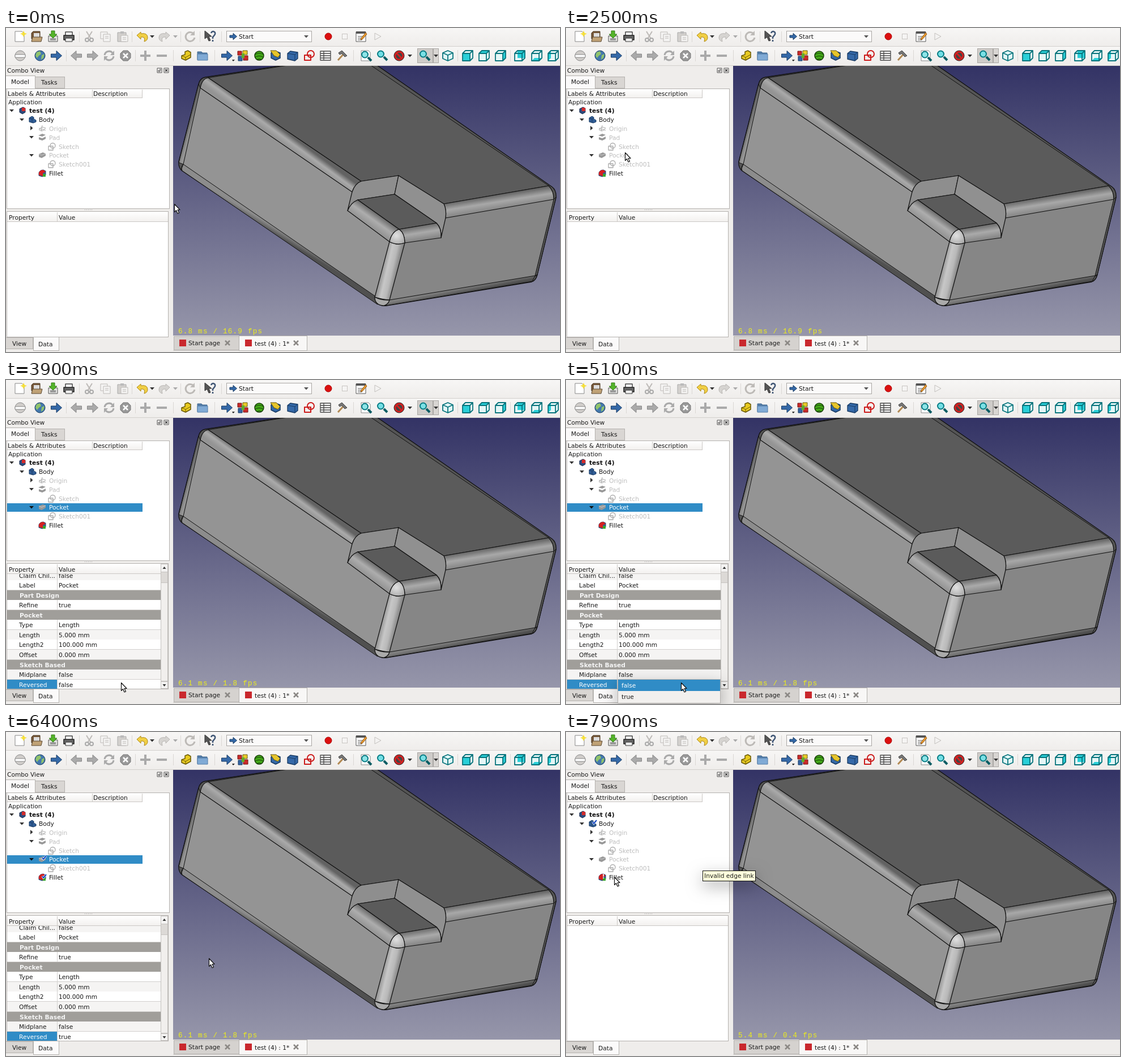
Write an HTML page with a canvas that moves like this. It is 978x573 px and loops after 8000 ms.

```html
<!DOCTYPE html>
<html lang="en">
<head>
<meta charset="utf-8">
<title>Editing a pocket</title>
<style>
html, body { margin: 0; height: 100%; overflow: hidden; background: #efedeb }
canvas { display: block }
</style>
</head>
<body>
<canvas id="stage" width="978" height="573"></canvas>
<script>
const W = 978, H = 573, LOOP = 8000, BLUE = '#308cc6', PANEL = '#efedeb', EDGE = '#b4b1ae';
const stage = document.getElementById('stage').getContext('2d');
const backdrop = document.createElement('canvas');
backdrop.width = W;
backdrop.height = H;
let c = backdrop.getContext('2d');

function rect(x, y, w, h, fill, stroke) {
  if (fill) { c.fillStyle = fill; c.fillRect(x, y, w, h); }
  if (stroke) { c.strokeStyle = stroke; c.lineWidth = 1; c.strokeRect(x + .5, y + .5, w - 1, h - 1); }
}
function path(d, fill, stroke, width = 1) {
  const p = new Path2D(d);
  if (fill) { c.fillStyle = fill; c.fill(p); }
  if (stroke) { c.strokeStyle = stroke; c.lineWidth = width; c.stroke(p); }
}
// Each part is [path, fill, stroke, line width], drawn around (x, y).
function icon(x, y, ...parts) {
  c.save();
  c.translate(x, y);
  c.lineJoin = 'round';
  parts.forEach(part => path(...part));
  c.restore();
}
function text(s, x, y, color = '#1a1a1a', bold = '') {
  c.font = `${bold} 10.67px "DejaVu Sans", sans-serif`;
  c.fillStyle = color;
  c.fillText(s, x, y);
}
function gradient(x1, y1, x2, y2, ...colors) {
  const g = c.createLinearGradient(x1, y1, x2, y2);
  colors.forEach((color, i) => g.addColorStop(i / (colors.length - 1), color));
  return g;
}
const circle = r => `M${-r} 0a${r} ${r} 0 1 0 ${2 * r} 0a${r} ${r} 0 1 0 ${-2 * r} 0Z`;
const DOWN = 'M-4 -2H4L0 2.5Z', RIGHT = 'M-2 -4V4L2.5 0Z';
const ARROW = 'M-9.5 -3H0V-8.5L9.5 0L0 8.5V3H-9.5Z', BACK = 'M9.5 -3H0V-8.5L-9.5 0L0 8.5V3H9.5Z';

function solid() {
  const ink = '#111';
  c.save();
  c.beginPath();
  c.rect(295, 67, 683, 477);
  c.clip();
  c.lineJoin = 'round';
  rect(295, 67, 683, 477, gradient(0, 67, 0, 544, '#333365', '#9696aa'));
  path('M340 99Q343 88 352 87L490 66H655L964 281Q972 287 971 300L938 436Q936 446 928 449L672 491Q660 493 652 484L310 252Q304 246 305 236Z', '#555', ink, 1.3);
  path('M357 88L497 66H644L958 279L773 311L693 261L627 271Z', '#5b5b5b', ink);
  path('M343 106L611 290L603 323L677 378L651 476L313 241Z', '#949494');
  path('M704 380L768 371L776 336L967 303L934 438L677 481Z', '#868686');
  path('M343 106L313 241L305 238L340 99Z', gradient(320, 165, 330, 168, '#505050', '#949494'), ink);
  path('M343 106Q346 90 357 88L627 271Q616 275 611 290Z', gradient(487, 179, 476, 194, '#626262', '#aaa', '#949494'), ink, 1.2);
  path('M773 311L958 279Q967 288 967 303L776 336Q778 322 773 311Z', gradient(866, 295, 870, 320, '#626262', '#a8a8a8', '#868686'), ink, 1.2);
  path('M313 241L660 480L656 489L309 251Z', gradient(486, 359, 480, 369, '#8c8c8c', '#505050'), ink);
  path('M677 481L934 438L929 448L670 491Z', gradient(800, 460, 802, 470, '#808080', '#4c4c4c'), ink);
  path('M967 303L934 438L938 436L971 299Z', '#555', ink);
  path('M627 271L693 261L686 294L621 304Q609 309 603 323L611 290Q616 275 627 271Z', '#8e8e8e', ink, 1.2);
  path('M693 261L773 311Q778 322 776 336L768 371Q769 354 760 345L686 294Z', '#909090', ink, 1.2);
  path('M621 304L686 294L760 345L694 356Z', '#5b5b5b', ink, 1.2);
  path('M621 304L694 356Q681 360 677 378L603 323Q609 309 621 304Z', gradient(658, 330, 643, 351, '#686868', '#adadad', '#949494'), ink, 1.2);
  path('M694 356L760 345Q769 354 768 371L704 380Q704 363 694 356Z', gradient(727, 350, 731, 375, '#686868', '#aaa', '#868686'), ink, 1.2);
  path('M677 378Q690 385 704 380L677 481Q665 480 651 476Z', gradient(664, 425, 690, 431, '#949494', '#c7c7c7', '#b9b9b9', '#868686'), ink, 1.2);
  const shine = c.createRadialGradient(689, 367, 1, 689, 367, 20);
  shine.addColorStop(0, '#dedede');
  shine.addColorStop(1, '#a2a2a2');
  path('M694 356Q681 360 677 378Q690 385 704 380Q704 363 694 356Z', shine, ink, 1.2);
  path('M651 476Q651 490 667 491Q675 489 677 481Q663 482 651 476Z', '#aaa', ink, 1.2);
  path('M313 241Q308 246 311 252M934 438Q938 440 938 436', null, ink);
  c.restore();
}

function topToolbar() {
  const faded = '#bdbab7', dark = '#444';
  const sheet = 'M-8 -9H4L8 -5V9H-8Z';
  icon(24, 15, [sheet, '#fff', '#888'], ['M7 -10L9 -6L13 -5L9 -3L7 1L5 -3L1 -5L5 -6Z', '#f5df38']);
  icon(54, 15, ['M-9 -6L-6 -9H6V4H-9Z', '#765839', '#4c3822'], ['M-5 -6H5V2H-5Z', '#ddd'], ['M-9 9L-7 1H10L8 9Z', '#c0a276', '#5b4831']);
  icon(83, 15, ['M-8 -1H8V9H-8Z', '#e4e4e2', '#555'], ['M-5 3H5V7H-5Z', '#999'], ['M-3 -10H3V-4H7L0 3L-7 -4H-3Z', '#55b52a', '#317b17']);
  icon(111, 15, ['M-6 -8H6V0H-6Z', '#fff', dark, 1.5], ['M-9 -2H9V6H-9Z', '#666', '#222', 1.5], ['M-6 3H6V9H-6Z', '#eee', '#333']);
  icon(147, 15, ['M-5 -9L3 4M5 -9L-3 4', null, faded, 2], ['M-7 6a3 3 0 1 0 6 0a3 3 0 1 0 -6 0M1 6a3 3 0 1 0 6 0a3 3 0 1 0 -6 0', null, '#aaa', 2]);
  icon(176, 15, ['M-9 -8H3V4H-9Z', '#f4f3f2', faded], ['M-4 -4H8V9H-4ZM-1 0H5M-1 3H5', '#f4f3f2', faded]);
  icon(206, 15, ['M-9 -7H6V9H-9Z', '#d3d0cd', '#aaa'], ['M-4 -9H2V-5H-4Z', '#bbb'], ['M-3 -2H9V9H-3ZM0 2H6M0 5H6', '#f4f3f2', faded]);
  const undo = 'M-10 -2L-3 -8V-5Q9 -7 9 2Q9 7 3 9Q6 0 -3 1V5Z';
  icon(241, 15, [undo, '#f1cf45', '#ae8a14']);
  icon(258, 15, [DOWN, '#333']);
  c.save();
  c.translate(279, 15);
  c.scale(-1, 1);
  path(undo, '#d6d4d1', '#b9b6b3');
  c.restore();
  icon(299, 15, [DOWN, '#aaa']);
  icon(325, 15, ['M6 -5A8 8 0 1 0 8 2', null, faded, 3], ['M8 -10V-2H0Z', faded]);
  icon(360, 15, ['M-9 -10V4L-5 1L-2 8L1 7L-2 0H3Z', '#555', '#333'], ['M2 -6Q3 -9 6 -9Q10 -8 9 -4Q8 -2 5 1V4M5 6V9', null, '#405675', 2.5]);
  rect(389, 5, 151, 20, '#fbfafa', '#aaa7a4');
  icon(401, 15, ['M-6 -2H0V-5.5L6.5 0L0 5.5V2H-6Z', '#3569a8', '#173a63']);
  text('Start', 411, 19);
  icon(530, 15, [DOWN, '#555']);
  icon(569, 15, [circle(6), '#dc1010', '#a00']);
  rect(593, 10, 10, 10, '#f5f4f3', '#c8c5c2');
  icon(627, 15, ['M-9 -8H8V9H-9ZM-6 0H4M-6 3H4M-6 6H2', '#fff', '#555'], ['M-9 -9H8V-5H-9Z', '#555'], ['M8 -7L10 -4L2 5L-1 6L0 3Z', '#e99b2e', '#8f571b']);
  icon(656, 15, ['M-5 -6L6 0L-5 6Z', '#f3f2f1', '#c3c0bd']);
}

function viewCube(x, face) {
  icon(x, 49, ['M-9 -4L-4 -9H9V4L4 9H-9Z', '#e5f6f6'], [face, '#29cfd8'],
    ['M-9 -4L-4 -9H9V4L4 9H-9ZM-9 -4H4V9M4 -4L9 -9', null, '#08747c', 1.8]);
}
function magnifier(x, y, lens) {
  icon(x, y, ['M2 2L8 8', null, '#075c63', 4], ['M-9 -3a5.5 5.5 0 1 0 11 0a5.5 5.5 0 1 0 -11 0Z', lens, '#087b83', 2]);
}
function lowerToolbar() {
  const faded = '#aaa', rim = '#888', blue = '#3569a8', navy = '#173a63';
  icon(25, 49, [circle(9), '#d0cdca', rim], ['M-9 -2H9V3H-9Z', '#fff', rim]);
  icon(60, 49, [circle(9), '#4479ad', '#173a63'], ['M-6 -6L0 -8L2 -3L-2 0L-5 4L-8 0ZM3 -1L8 -3L6 4L2 7Z', '#91c46b']);
  icon(89, 49, [ARROW, blue, navy]);
  icon(124, 49, [BACK, faded, rim]);
  icon(153, 49, [ARROW, faded, rim]);
  icon(182, 49, ['M-8 -1A8 8 0 0 1 6 -5M8 1A8 8 0 0 1 -6 5', null, faded, 3], ['M9 -9V-1H2ZM-9 9V1H-2Z', faded]);
  icon(211, 49, ['M-4 -9H4L9 -4V4L4 9H-4L-9 4V-4Z', '#999', '#777'], ['M-4 -4L4 4M4 -4L-4 4', null, '#fff', 2.5]);
  icon(246, 49, ['M-9 0H9M0 -9V9', null, faded, 4]);
  icon(275, 49, ['M-9 0H9', null, faded, 4]);
  icon(318, 49, ['M-8 0L-2 -2V-7L3 -9L8 -6V3L-1 8L-8 5Z', '#e8ca20', '#6c5b05', 1.5], ['M-8 0L-1 3L8 -2M-1 3V8', null, '#6c5b05']);
  icon(347, 49, ['M-9 -7H-2L0 -5H8V7H-9Z', '#527ca7', '#456a91'], ['M-9 -3H9V8H-9Z', '#80aad5', '#527ca7']);
  icon(390, 49, [ARROW, blue, navy]);
  icon(401, 57, ['M-2 -1H3L0 2Z', '#222']);
  icon(418, 49, ['M-9 -8H-2V-1H-9Z', '#cc2929', '#701616'], ['M0 -9H8V-2H0Z', '#e9cb27', '#685c14'], ['M-8 1H-1V9H-8Z', '#3464a4', navy], ['M1 0H9V8H1Z', '#cc2929', '#701616'], ['M-2 -4H3V4H-2Z', '#62ad27']);
  icon(447, 49, [circle(8), '#43a818', '#173f08', 1.5], ['M-8 -2Q0 -7 8 -2M-8 3Q0 -2 8 3M-4 7Q0 4 4 7', null, '#173f08']);
  icon(476, 49, ['M-8 -5L0 -8L8 -5V4L0 8L-8 4Z', blue, navy, 1.5], ['M-9 -9H1L8 -2L4 3L-3 0Z', '#e6c52c', '#665406']);
  icon(506, 49, ['M-9 -4L-4 -8L9 -6V5L4 9L-9 6Z', blue, navy, 1.3], ['M-9 -4L4 -2L9 -6M4 -2V9', null, navy]);
  icon(535, 49, ['M-8 -1H3V8H-8Z', null, '#cc1b1b', 2], ['M-3 -3a6 6 0 1 0 12 0a6 6 0 1 0 -12 0', null, '#cc1b1b', 2]);
  icon(564, 49, ['M-9 -8H9V8H-9ZM-9 -4H9M-9 0H9M-9 4H9M-3 -8V8', '#fff', '#444', 1.3]);
  icon(593, 49, ['M-7 8L2 -2', null, '#b38a53', 3], ['M-6 -5L0 -9L9 0L5 2L0 -4L-4 -2Z', '#777', '#444']);
  icon(635, 49, ['M-8 -9H5L8 -6V9H-8Z', '#fff', '#888']);
  magnifier(637, 50, '#8ee4e7');
  magnifier(665, 49, '#73dfe5');
  icon(694, 49, [circle(9), '#444', '#222'], [circle(7), null, '#d32020', 3], ['M-5 -5L5 5', null, '#d32020', 3]);
  icon(713, 49, [DOWN, '#333']);
  rect(726, 36, 28, 26, '#cfccc9', '#aaa7a4');
  rect(754, 36, 10, 26, '#d9d6d3', '#aaa7a4');
  magnifier(740, 49, '#7be0e5');
  icon(759, 49, [DOWN, '#333']);
  icon(780, 49, ['M0 -9L9 -5V5L0 9L-9 5V-5Z', '#e1f7f7', '#08747c', 1.8], ['M-9 -5L0 -1L9 -5M0 -1V9', null, '#08747c', 1.8]);
  viewCube(815, 'M-9 -4H4V9H-9Z');
  viewCube(844, 'M-9 -4L-4 -9H9L4 -4Z');
  viewCube(873, 'M4 -4L9 -9V4L4 9Z');
  viewCube(907, 'M-4 -9H9V4H-4Z');
  viewCube(937, 'M-9 9L-4 4H9L4 9Z');
  viewCube(966, 'M-9 -4L-4 -9V4L-9 9Z');
}

function sketchIcon(x, y) {
  icon(x, y, ['M-6 -1H2V6H-6Z', null, '#aaa', 1.3], ['M-3 -2a4.5 4.5 0 1 0 9 0a4.5 4.5 0 1 0 -9 0', null, '#aaa', 1.3]);
}
function pocketIcon(x, y) {
  icon(x, y, ['M-6 -2L1 -5L6 -3V1L-1 5L-6 3Z', '#999'], ['M-6 -2L-1 0L6 -3', null, '#ccc']);
}
function header(x, y, w, h) {
  rect(x, y, w, h, gradient(0, y, 0, y + h, '#fff', '#f2f0ee'));
}
function tree() {
  const faded = '#bdbdbd';
  rect(1, 107, 288, 213, '#fff', EDGE);
  header(2, 108, 239, 16);
  path('M2 123.5H241M152.5 109V123M240.5 109V123', null, '#cbc8c5');
  text('Labels & Attributes', 3, 120);
  text('Description', 154, 120);
  text('Application', 4, 135);
  text('test (4)', 41, 150, '#111', 'bold');
  text('Body', 58, 166);
  text('Origin', 76, 182, faded);
  text('Pad', 76, 198, faded);
  text('Sketch', 93, 213.5, faded);
  text('Sketch001', 93, 245, faded);
  text('Fillet', 76, 261);
  [[10, 146], [28, 162], [45, 193]].forEach(([x, y]) => icon(x, y, [DOWN, '#333']));
  icon(45, 177, [RIGHT, '#333']);
  icon(29, 146, ['M-5 -3L1 -6L5 -4V3L0 6L-5 3Z', '#2a4b7e', '#15294b'], ['M-1 -5H5V1H-1Z', '#d42b2b']);
  icon(47, 162, ['M-6 -3L-1 -6L2 -4V-1L6 1V4L1 6L-6 4Z', '#315d96', '#173a63'], ['M-6 -3L-1 -1L2 -3M-1 -1V5', null, '#173a63']);
  icon(64, 178, ['M-6 2L-1 -3L6 -1L1 4ZM-2 5L0 -6M-6 -1L6 3', null, '#aaa']);
  icon(64, 193, ['M-7 -3L0 -6L6 -4L0 -1ZM-6 0L0 2L6 -1V3L0 6L-6 4Z', '#999']);
  sketchIcon(81, 210);
  sketchIcon(81, 241);
  icon(64, 257, ['M-6 4V-1Q-4 -6 2 -6L6 -4V3L0 6Z', '#335c94', '#26446e'], ['M-6 3V-1Q-4 -6 2 -6L6 -3L1 0V5Z', '#d62020'], ['M1 1H6V6H1Z', '#38a82d']);
}

function closeMark(x) {
  icon(x, 557, ['M-4 -4L4 4M4 -4L-4 4', null, '#8b8885', 2.5]);
}
function paintBackdrop() {
  rect(0, 0, W, H, PANEL);
  rect(0, 0, W, 32, gradient(0, 0, 0, 32, '#f7f6f5', PANEL));
  rect(0, 33, W, 33, gradient(0, 33, 0, 66, '#f7f6f5', PANEL));
  path('M0 32.5H978M0 66.5H978', null, '#d3d0cd');
  path('M129.5 6V25M222.5 6V25M308.5 6V25M342.5 6V25M380.5 6V25M106.5 39V59M228.5 39V59M295.5 39V59M368.5 39V59M613.5 39V59M797.5 39V59M890.5 39V59', null, '#dad7d4');
  topToolbar();
  lowerToolbar();
  text('Combo View', 2, 79);
  [271, 283].forEach(x => icon(x, 75, ['M-4 -4H4V4H-4Z', null, '#555']));
  icon(271, 75, ['M-2 0H1V2H-2ZM0 -2H2V0', null, '#555']);
  icon(283, 75, ['M-2 -2L2 2M2 -2L-2 2', null, '#333', 1.3]);
  rect(51, 86, 53, 21, '#d9d6d3', EDGE);
  rect(-1, 84, 53, 24, '#fbfafa', EDGE);
  text('Model', 9, 99);
  text('Tasks', 62, 100);
  tree();
  for (let x = 139; x < 154; x += 3) rect(x, 321, 1, 1, '#999');
  rect(-1, 547, 49, 21, '#d9d6d3', EDGE);
  rect(48, 546, 46, 25, '#fbfafa', EDGE);
  text('View', 11, 562);
  text('Data', 57, 563);
  solid();
  rect(295, 544, 683, 29, PANEL);
  path('M295 570.5H978', null, '#d3d0cd');
  rect(296, 545, 116, 25, '#d5d2cf', EDGE);
  rect(411, 544, 121, 27, '#f8f7f6', EDGE);
  rect(306, 551, 12, 12, '#c9282d');
  rect(422, 551, 12, 12, '#c9282d');
  text('Start page', 322, 561);
  text('test (4) : 1*', 439, 562);
  closeMark(391);
  closeMark(512);
}

const PROPERTIES = [['Base'], ['Claim Chil...', 'false'], ['Label', 'Pocket'], ['Part Design'], ['Refine', 'true'],
  ['Pocket'], ['Type', 'Length'], ['Length', '5.000 mm'], ['Length2', '100.000 mm'], ['Offset', '0.000 mm'],
  ['Sketch Based'], ['Midplane', 'false'], ['Reversed', 'false']];

function propertyRows(t, shift) {
  c.save();
  c.beginPath();
  c.rect(2, 343, 271, 203);
  c.clip();
  PROPERTIES.forEach(([name, value], i) => {
    const y = Math.round(319 + i * 17.55 + shift), base = y + 13;
    if (!value) {
      rect(2, y, 271, 17, '#a09e9a');
      text(name, 24, base, '#f5f5f5', 'bold');
      return;
    }
    const active = name === 'Reversed' && t >= 3900;
    rect(2, y, 271, 18, i % 2 ? '#f5f4f3' : '#fff');
    if (active) rect(2, y, 88, 17, BLUE);
    path(`M2 ${y + 17.5}H273M90.5 ${y}V${y + 18}`, null, '#d2d0ce');
    text(name, 23, base, active ? '#fff' : undefined);
    text(active && t >= 5900 ? 'true' : value, 93, base);
  });
  c.restore();
}
function scrollBar(handleTop) {
  const border = '#c6c3c0';
  rect(273, 325, 13, 221, '#dcd9d6', border);
  rect(273, 325, 13, 15, '#f4f3f2', border);
  rect(273, handleTop, 13, 175, '#f1efed', border);
  rect(273, 533, 13, 13, '#f4f3f2', border);
  icon(279.5, 332, ['M-3 2H3L0 -2Z', '#333']);
  icon(279.5, 540, ['M-3 -2H3L0 2Z', '#333']);
}
function properties(t, selected) {
  rect(1, 324, 286, 223, '#fff', EDGE);
  if (selected) {
    const scrolled = t >= 3700;
    propertyRows(t, scrolled ? 0 : 24);
    scrollBar(scrolled ? 358 : 340);
  }
  const width = selected ? 271 : 284;
  header(2, 325, width, 18);
  path(`M2 342.5H${width + 2}M90.5 326V342`, null, '#cbc8c5');
  text('Property', 5, 338.5);
  text('Value', 93, 338.5);
}

function floating(x, y, w, h, fill, border) {
  c.save();
  c.shadowColor = 'rgba(0,0,0,.3)';
  c.shadowBlur = 28;
  c.shadowOffsetY = 9;
  rect(x, y, w, h, fill);
  c.restore();
  rect(x, y, w, h, null, border);
}
function valueEditor(t) {
  if (t < 5100) {
    rect(91, 529, 182, 17, '#f8f7f6', '#aaa7a4');
    text('false', 98, 542);
    icon(263, 538, [DOWN, '#555']);
    return;
  }
  floating(91, 529, 182, 43, '#f2f0ee', EDGE);
  const hoverTrue = t >= 5500;
  rect(92, hoverTrue ? 550 : 530, 180, 20, BLUE);
  text('false', 98, 544, hoverTrue ? undefined : '#fff');
  text('true', 98, 564, hoverTrue ? '#fff' : undefined);
}

function checkMark(x, y) {
  icon(x, y, ['M-3 -1L-1 2L4 -4', null, '#fff', 3.5], ['M-3 -1L-1 2L4 -4', null, '#1749c5', 2]);
}

// time, x, y of the pointer's tip
const POINTER = [[0, 297, 311], [700, 297, 311], [900, 286, 308], [1100, 286, 308], [1300, 274, 306], [1500, 274, 306],
  [2400, 102, 229], [2500, 104, 220], [3200, 104, 220], [3900, 203, 535], [5300, 203, 535], [5600, 194, 555],
  [5900, 194, 555], [6400, 358, 400], [6700, 536, 399], [7100, 156, 270], [7600, 84, 261], [7900, 85, 256]];

function pointer(t) {
  const i = Math.max(1, POINTER.findIndex(k => k[0] >= t));
  const [t0, x0, y0] = POINTER[i - 1], [t1, x1, y1] = POINTER[i];
  const u = (t - t0) / (t1 - t0), e = u * u * (3 - 2 * u);
  icon(Math.round(x0 + (x1 - x0) * e), Math.round(y0 + (y1 - y0) * e),
    ['M.5 .5V14.5L3.5 11.5L6 17L8.5 16L6 10.5H10Z', '#fff', '#111', 1.2]);
}

function draw(t) {
  const selected = t >= 3200 && t < 6700, recomputed = t >= 6700;
  c.drawImage(backdrop, 0, 0);
  if (selected) rect(2, 218, 239, 15, BLUE);
  icon(45, 225, [DOWN, selected ? '#111' : '#333']);
  pocketIcon(64, 225);
  text('Pocket', 76, 229, selected ? '#fff' : '#bdbdbd');
  if (selected && t >= 6000) { checkMark(67, 223); checkMark(67, 256); }
  if (recomputed) {
    checkMark(50, 160);
    icon(66, 255, ['M0 -4V1M0 2V4', null, '#fff', 1.6]);
  }
  properties(t, selected);
  c.font = '12.5px "Liberation Mono", monospace';
  c.letterSpacing = '1.28px';
  c.fillStyle = '#eeee18';
  c.fillText(recomputed ? '5.4 ms / 0.4 fps' : selected ? '6.1 ms / 1.8 fps' : '6.8 ms / 16.9 fps', 304, 540);
  c.letterSpacing = '0px';
  if (t >= 4400 && t < 5900) valueEditor(t);
  if (t >= 7600) {
    floating(241, 245, 94, 19, '#ffffdc', '#111');
    text('Invalid edge link', 244, 258);
  }
  pointer(t);
}

paintBackdrop();
c = stage;
function tick(now) {
  draw(Math.floor(now % LOOP / 100) * 100);
  requestAnimationFrame(tick);
}
tick(performance.now());
</script>
</body>
</html>
```
